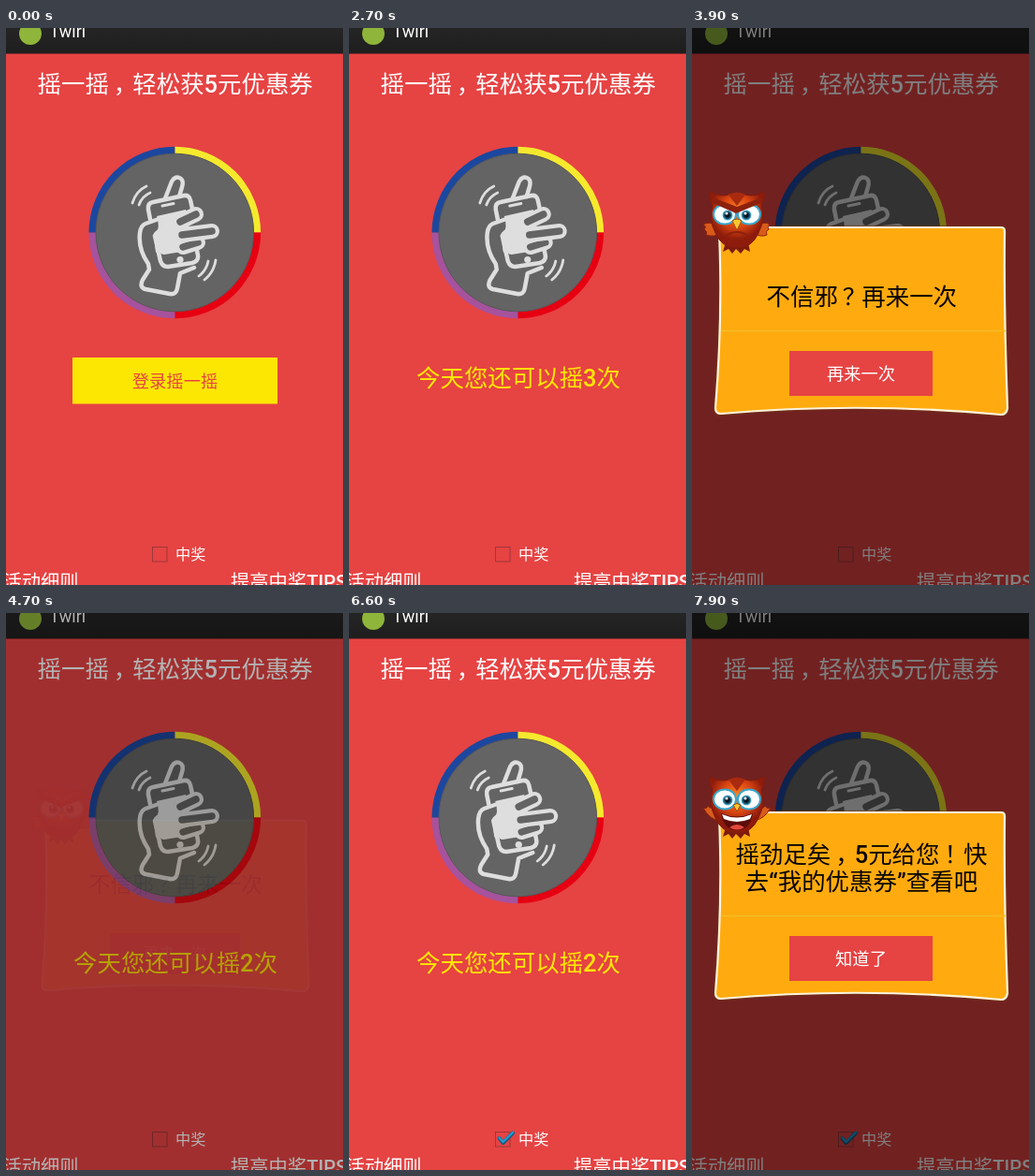
These frames come from a looping animation (360x595 px, 8000 ms). An HTML page:

```html
<!DOCTYPE html>
<html lang="zh-CN">
<head>
<meta charset="utf-8">
<title>Twirl</title>
<style>
html, body { margin: 0; width: 100%; height: 100%; overflow: hidden; background: #e64343; }
svg { display: block; width: 360px; height: 595px; }
text { font-family: Roboto, "Noto Sans CJK SC", "Noto Sans CJK", sans-serif; font-weight: 500; fill: #fff; }
.big { font-size: 25.45px; }
.mid { font-size: 18.3px; }
.foot { font-size: 20.3px; }
.yellow { fill: #ffe800; }
.dark { fill: #080400; }
.mark { fill: none; stroke: #dedede; stroke-width: 4.5; stroke-linecap: round; stroke-linejoin: round; }
</style>
</head>
<body>
<svg viewBox="0 0 360 595">
  <defs>
    <linearGradient id="bar" x2="0" y2="1">
      <stop offset="0" stop-color="#252525"/><stop offset="1" stop-color="#1e1e1e"/>
    </linearGradient>
    <radialGradient id="fur" cy=".35">
      <stop offset="0" stop-color="#f98a24"/><stop offset=".55" stop-color="#dc4712"/><stop offset="1" stop-color="#8e1b0b"/>
    </radialGradient>
    <radialGradient id="iris">
      <stop offset=".3" stop-color="#06131c"/><stop offset=".6" stop-color="#15435d"/><stop offset="1" stop-color="#54c9ee"/>
    </radialGradient>
    <path id="card" d="M34 213H330Q334 213 334 217Q333 300 337 406Q336 413 330 413Q180 399 31 412Q25 412 25 406Q33 310 29 217Q29 213 34 213Z"/>
  </defs>

  <rect width="360" height="595" fill="#e64343"/>
  <rect width="360" height="27" fill="url(#bar)"/>
  <rect y="27" width="360" height="1" fill="#8a2c2c"/>
  <circle cx="26" cy="6" r="12" fill="#8fb53a"/>
  <text x="46.500" y="9.500" font-size="18" style="font-weight:400">Twirl</text>
  <text class="big" x="33.500" y="68.800">摇一摇<tspan dx="5">，</tspan><tspan dx="-5">轻松获5元优惠券</tspan></text>

  <g id="ring" fill="none" stroke-width="8"></g>
  <circle cx="180.300" cy="218.500" r="84.300" fill="#646464" stroke="#575757"/>

  <g id="hand" class="mark">
    <path d="M170 182L177 164Q181 157 187 161Q190 164 188 170L185 180"/>
    <path d="M154 204L152 194Q151 187 157 186L190 179Q196 178 197 184L199 193"/>
    <path d="M167 190L179 187.500" stroke-width="3"/>
    <path d="M161 201L192 194L200 234Q200 237 197 237.500L169 242Q165 242 164 238L160 221Q165 212 161 201Z" fill="#dedede" stroke="none"/>
    <path d="M159 222L165 249Q167 255 173 255L199 251Q206 249 205 243L203 232"/>
    <circle cx="186" cy="247.500" r="3.600" fill="#dedede" stroke="none"/>
    <path d="M166 203L149 209Q144 211 143 219Q141 236 152 252L153 258L146 269Q142 277 149 279L175 284Q182 285 183 278L186 262L201 256"/>
    <path d="M166 203Q171 212 160 220L162 238"/>
    <g id="fingers"></g>
    <g stroke-width="2.800">
      <path d="M135 187Q139 174 150 169M142 189Q145 180 154 176"/>
      <path d="M206 265Q214 259 216 249M212 269Q222 261 224 248"/>
    </g>
  </g>

  <g id="login">
    <rect x="71" y="352" width="219" height="49.500" fill="#fce703"/>
    <text class="mid" x="180.500" y="384" text-anchor="middle" style="fill:#e64343">登录摇一摇</text>
  </g>
  <text id="left" class="big yellow" x="72" y="383.400"></text>

  <rect x="156.500" y="554.500" width="15.500" height="15.500" fill="none" stroke="#9c3838"/>
  <g id="tick" fill="none" stroke-linecap="round" stroke-linejoin="round">
    <path d="M160.500 561L164.500 566L175 555.500" stroke="#17577f" stroke-width="4"/>
    <path d="M160.500 560.500L164.500 565L175 554.800" stroke="#239bd2" stroke-width="2.400"/>
  </g>
  <text x="181" y="568.300" font-size="16.200">中奖</text>
  <text class="foot" x="-3.500" y="599.300">活动细则</text>
  <text class="foot" x="240" y="599.300">提高中奖TIPS</text>

  <rect id="dim" width="360" height="595"/>

  <g id="dialog">
    <use href="#card" fill="#ffab0f" stroke="#6b3a14" stroke-width="4.500" stroke-opacity=".55"/>
    <use href="#card" fill="#ffab0f" stroke="#fff3dc" stroke-width="2.200"/>
    <path d="M31 323.500H335" stroke="#f2bd22" stroke-width="1.500"/>
    <rect x="104" y="345" width="153" height="48" fill="#e64343"/>
    <g id="retry">
      <text class="big dark" x="79.500" y="296.300">不信邪<tspan dx="5">？</tspan><tspan dx="-5">再来一次</tspan></text>
      <text class="mid" x="180.500" y="375.500" text-anchor="middle">再来一次</text>
    </g>
    <g id="win">
      <text class="big dark" x="46.500" y="267.300">摇劲足矣<tspan dx="5">，</tspan><tspan dx="-5">5元给您</tspan><tspan dx="5">！</tspan><tspan dx="-5">快</tspan></text>
      <text class="big dark" x="56.500" y="296.300">去“我的优惠券”查看吧</text>
      <text class="mid" x="180.500" y="375.500" text-anchor="middle">知道了</text>
    </g>

    <g id="owl" stroke-linejoin="round">
      <g id="wingsDown" fill="#d95b1b" stroke="#8e230d">
        <path d="M27 211Q17 206 12 210Q16 212 13 215Q17 217 15 221Q23 224 32 219Z"/>
        <path d="M69 211Q79 206 83 210Q80 212 82 215Q78 217 80 221Q74 224 65 219Z"/>
      </g>
      <g id="wingsUp" fill="#d95b1b" stroke="#8e230d">
        <path d="M29 222Q18 220 12 208Q16 210 17 206Q20 210 23 207Q25 212 31 214Z"/>
        <path d="M66 222Q78 220 84 208Q80 210 78 206Q76 210 73 207Q71 212 65 214Z"/>
      </g>
      <path d="M36 229L33 239L39 236L43 241L47 236L52 241L56 236L62 239L60 229Z" fill="#7d1b0d"/>
      <path d="M19 175Q31 181 39 178Q48 175 57 178Q66 181 77 175Q78 184 74 189Q79 203 71 219Q64 235 48 235Q32 235 25 219Q17 203 22 189Q18 184 19 175Z" fill="url(#fur)" stroke="#831b0b"/>
      <path d="M39 178Q48 173 57 178L48 190Z" fill="#a92b0f"/>
      <g id="eyes"></g>
      <g id="frown">
        <path d="M20 186L47 198L76 186L74 181L48 191L22 181Z" fill="#8d210d"/>
        <path d="M43 206Q48 202 53 206L48 216Z" fill="#ffc52e" stroke="#9b4b0b"/>
        <path d="M36 222Q48 214 60 222M39 228Q48 221 57 228" fill="none" stroke="#8d210d" stroke-width="2"/>
      </g>
      <g id="smile">
        <path d="M31 214Q48 221 65 214Q62 232 48 232Q34 232 31 214Z" fill="#5c0c0b"/>
        <path d="M32 215Q48 222 64 215L62 220Q48 226 34 220Z" fill="#fff"/>
        <path d="M40 229Q48 223 56 229Q48 234 40 229Z" fill="#e14a3c"/>
        <path d="M44 205Q48 202 52 205L48 212Z" fill="#ffc52e" stroke="#9b4b0b"/>
      </g>
    </g>
  </g>
</svg>
<script>
const LOOP = 8000, STEP = 100;
const $ = id => document.getElementById(id);
const clamp = v => Math.max(0, Math.min(1, v));
const show = (id, on) => $(id).style.display = on ? '' : 'none';

// Quarter arcs, clockwise from the top
$('ring').innerHTML = ['#f5e92d', '#e60012', '#a6529d', '#1c479f'].map((c, i) =>
  `<path d="M180.300 130.700A87.800 87.800 0 0 1 268.100 218.500" stroke="${c}" transform="rotate(${i * 90} 180.300 218.500)"/>`).join('');

$('fingers').innerHTML = [[189, 234, 205, 229], [188, 221, 220, 217], [186, 207, 203, 199]].map(([a, b, c, d]) =>
  [['#dedede', 16], ['#646464', 7.5]].map(([color, w]) =>
    `<path d="M${a} ${b}L${c} ${d}" stroke="${color}" stroke-width="${w}"/>`).join('')).join('');

$('eyes').innerHTML = [35, 61].map((x, i) =>
  `<ellipse cx="${x}" cy="199" rx="12" ry="10.500" fill="#fff" stroke="#3aa6cd" stroke-width="2"/>
   <circle cx="${x + (i ? -3 : 3)}" cy="200" r="5.500" fill="url(#iris)"/>
   <circle cx="${x + (i ? -4 : 2)}" cy="198" r="1.500" fill="#fff"/>`).join('');

// Seven cycles in one second
function wobble(t, start) {
  const p = (t - start) / 1000;
  return p > 0 && p < 1 ? 5 * Math.sin(p * 14 * Math.PI) : 0;
}

function popup(t) {
  const leaving = t >= 4400 && t < 7500;
  if (leaving) {
    const out = clamp((t - 4400) / 600);
    return {
      dim: .5 * (1 - out ** 1.3),
      alpha: clamp(1 - (t - 4400) / 312),
      scale: 1 - .087 * clamp((t - 4400) / 300)
    };
  }
  const k = clamp((t - (t < 7500 ? 3400 : 7500)) / 300);
  return { dim: .5 * k, alpha: clamp(k * 1.4), scale: .9 + .1 * (1 - (1 - k) ** 3) };
}

function draw(now) {
  const t = Math.floor(now % LOOP / STEP) * STEP;
  const won = t >= 7200;
  const { dim, alpha, scale } = popup(t);

  $('hand').setAttribute('transform', `translate(${wobble(t, 2100) + wobble(t, 6200)} 0)`);
  show('login', t < 1200);
  show('left', t >= 1200);
  $('left').textContent = `今天您还可以摇${t < 3100 ? 3 : won ? 1 : 2}次`;
  show('tick', t >= 5400);

  $('dim').setAttribute('opacity', dim);
  show('dialog', alpha > 0);
  $('dialog').setAttribute('opacity', alpha);
  $('dialog').setAttribute('transform', `translate(180 312) scale(${scale}) translate(-180 -312)`);
  for (const id of ['win', 'smile', 'wingsUp']) show(id, won);
  for (const id of ['retry', 'frown', 'wingsDown']) show(id, !won);
}

const begin = performance.now();
function tick() {
  draw(performance.now() - begin);
  requestAnimationFrame(tick);
}
tick();
</script>
</body>
</html>
```
